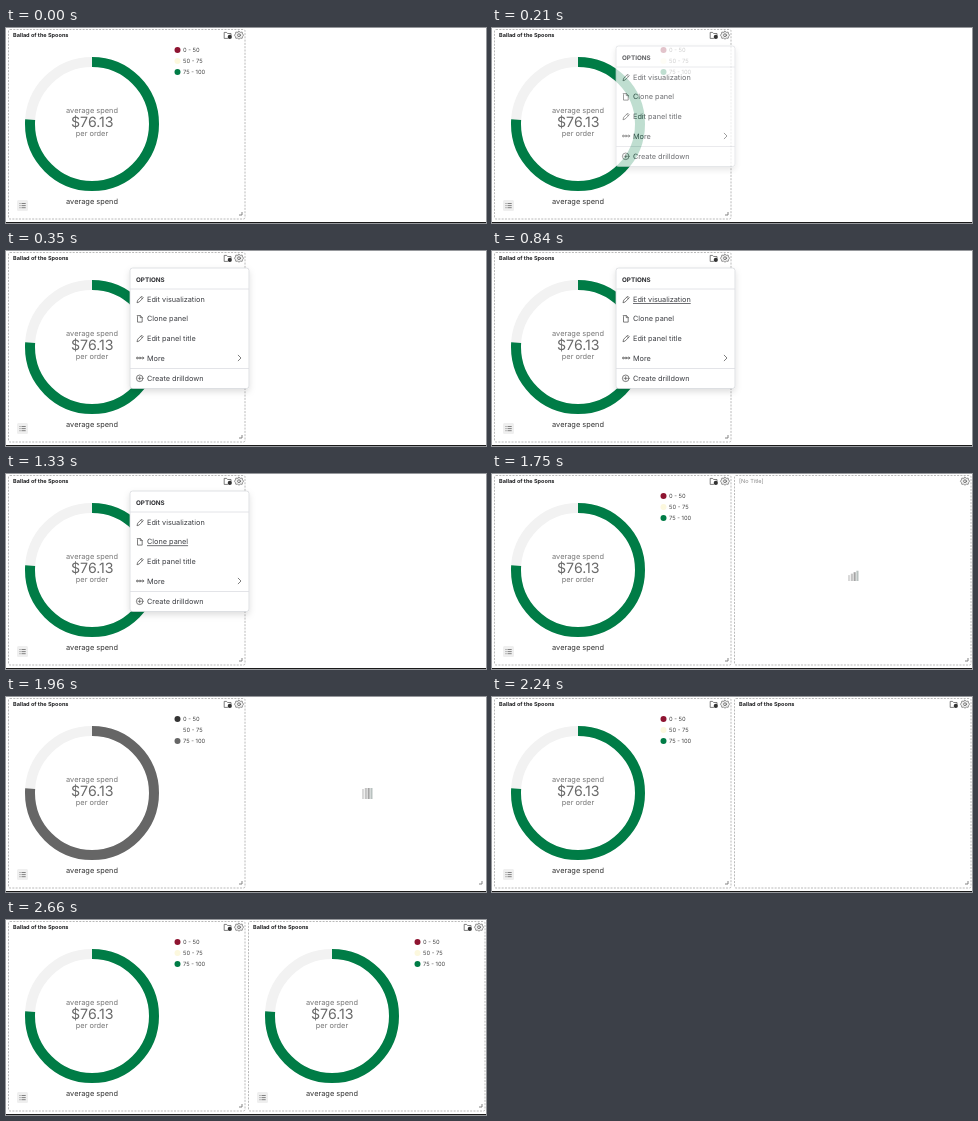
These frames come from a looping animation (480 px wide and 195 px high, 3010 ms). An HTML page:

```html
<!DOCTYPE html>
<html lang="en">
<head>
<meta charset="utf-8">
<title>Cloning a dashboard panel</title>
<style>
  html, body { margin: 0; width: 100%; height: 100%; overflow: hidden; background: #fff; }
  svg {
    display: block; width: 100%; height: 100%;
    font-family: Inter, "Liberation Sans", sans-serif;
    text-rendering: geometricPrecision;
    --good: #007c46; --mid: #fcf8de; --bad: #8e1431;
  }
  svg.mono { --good: #666; --mid: #fdfdfd; --bad: #343434; }
  .title { font-size: 5.55px; font-weight: 700; fill: #1d1e20; }
  .untitled { font-size: 5.6px; fill: #8a8a8a; }
  .legend { font-size: 5.8px; fill: #444; }
  .label { font-size: 7.4px; text-anchor: middle; fill: #777; }
  .value { font-size: 14.2px; text-anchor: middle; fill: #6a6a6a; }
  .caption { font-size: 7.4px; text-anchor: middle; fill: #333; }
  .item { font-size: 7.3px; fill: #3b3d42; }
  .head { font-size: 6.3px; font-weight: 700; fill: #2a2b2f; }
  .line { fill: none; stroke: #555; stroke-width: .75; stroke-linejoin: round; stroke-linecap: round; }
</style>
</head>
<body>
<svg id="stage" viewBox="0 0 480 195">
  <defs>
    <filter id="shadow" x="-15%" y="-15%" width="130%" height="135%">
      <feDropShadow dx="0" dy="3" stdDeviation="3" flood-color="#000" flood-opacity=".13"/>
    </filter>
    <clipPath id="loaderBox"><rect width="12" height="11"/></clipPath>

    <rect id="border" x="2.5" y="1.5" width="236.5" height="189.5" rx="1.5"
      fill="none" stroke="#a9a9a9" stroke-width=".8" stroke-dasharray="2 1.3"/>
    <path id="handle" d="M236 184v3h-3" fill="none" stroke="#777" stroke-width=".9"/>
    <g id="gear" class="line">
      <path d="M233 3.2l1.3 1.1 1.9-.2.4 1.8 1 1.3-1 1.4-.4 1.7-1.9-.1-1.3 1-1.3-1-1.9.1-.4-1.7-1-1.4 1-1.3.4-1.8 1.9.2z" fill="#f0f0f0" stroke="#737373"/>
      <circle cx="233" cy="7.2" r="1.4" fill="#fff"/>
    </g>
    <g id="folder">
      <path class="line" d="M221.5 10.4h-3.3v-6h2.4l1 1.1h3.4v1.6"/>
      <circle cx="223.8" cy="8.9" r="2.1" fill="#333"/>
    </g>
    <text id="name" class="title" x="7" y="9">Ballad of the Spoons</text>

    <g id="gauge">
      <circle cx="86" cy="96" r="62" fill="none" stroke="#f2f2f2" stroke-width="10"/>
      <circle cx="86" cy="96" r="62" fill="none" stroke="var(--good)" stroke-width="10"
        pathLength="100" stroke-dasharray="76.13 100" transform="rotate(-90 86 96)"/>
      <text class="label" x="86" y="85">average spend</text>
      <text class="value" x="86.3" y="99">$76.13</text>
      <text class="label" x="86" y="107.5">per order</text>
      <text class="caption" x="86" y="176">average spend</text>
      <g class="legend">
        <circle cx="171.5" cy="22" r="3" fill="var(--bad)"/><text x="177" y="24.1">0 - 50</text>
        <circle cx="171.5" cy="33" r="3" fill="var(--mid)"/><text x="177" y="35.1">50 - 75</text>
        <circle cx="171.5" cy="44" r="3" fill="var(--good)"/><text x="177" y="46.1">75 - 100</text>
      </g>
      <rect x="11" y="172" width="11" height="11" rx="1.5" fill="#efefef"/>
      <path d="M13.5 175.5h1m1 0h4.2M13.5 177.6h1m1 0h4.2M13.5 179.7h1m1 0h4.2" stroke="#777" stroke-width=".9"/>
    </g>
    <path id="pencil" class="line" d="M-2.9 2.9l.6-2.2 4-4 1.6 1.6-4 4zM.7-2.3l1.6 1.6"/>
  </defs>

  <use href="#border"/><use href="#handle"/><use href="#gear"/>
  <use href="#folder"/><use href="#name"/><use href="#gauge"/>

  <g transform="translate(240 0)">
    <use id="frame" href="#border"/>
    <use id="corner" href="#handle"/>
    <use id="cog" href="#gear"/>
    <text id="blank" class="untitled" x="7" y="9">[No Title]</text>
    <g id="named"><use href="#folder"/><use href="#name"/></g>
    <use id="copy" href="#gauge"/>
  </g>
  <g id="loader" clip-path="url(#loaderBox)"></g>

  <g id="menu">
    <rect x="124" y="17" width="119" height="120.5" rx="2.5" fill="#fff" stroke="#d2d4d8" stroke-width=".7" filter="url(#shadow)"/>
    <path d="M124 38h119M124 117.5h119" stroke="#dcdee2" stroke-width=".8"/>
    <text class="head" x="130" y="30.5">OPTIONS</text>
    <use href="#pencil" x="134" y="48.5"/>
    <path class="line" d="M131.5 65.8v5.3h4.7v-4.7l-1.8-1.8h-2.9zM134.3 64.7v1.9h1.9"/>
    <use href="#pencil" x="134" y="87.5"/>
    <g class="line">
      <circle cx="131.3" cy="107" r=".9"/><circle cx="134" cy="107" r=".9"/><circle cx="136.7" cy="107" r=".9"/>
      <path d="M232.2 104.2l2.8 2.8-2.8 2.8"/>
      <circle cx="133.7" cy="127.3" r="3.3"/><path d="M133.7 125.7v3.2M132.1 127.3h3.2"/>
    </g>
    <g class="item">
      <text id="edit" x="141" y="51">Edit visualization</text>
      <text id="clone" x="141" y="70.4">Clone panel</text>
      <text x="141" y="90">Edit panel title</text>
      <text x="141" y="109.8">More</text>
      <text x="141" y="129.9">Create drilldown</text>
    </g>
  </g>
  <rect y="194" width="480" height="1" fill="#1a1a1a"/>
</svg>

<script>
  const LOOP = 3010, STEP = 70;
  const $ = id => document.getElementById(id);
  const clamp = v => Math.max(0, Math.min(1, v));
  const show = (id, on) => $(id).style.display = on ? "" : "none";
  const underline = (id, on) => $(id).setAttribute("text-decoration", on ? "underline" : "none");

  const bars = ["#d9d9d9", "#c4c4c4", "#a4a4a4", "#b9c2c0"].map((color, i) => {
    const bar = document.createElementNS("http://www.w3.org/2000/svg", "rect");
    const attrs = { x: i * 2.8, width: 2.1, height: 11, fill: color };
    for (const key in attrs) bar.setAttribute(key, attrs[key]);
    return $("loader").appendChild(bar);
  });

  // Each bar dips by two thirds of its height, 100 ms after its neighbour.
  function drawLoader(age, y) {
    $("loader").setAttribute("transform", `translate(356 ${y})`);
    bars.forEach((bar, i) => {
      const phase = Math.max(0, age - i * 100) / 1000 % 1;
      bar.setAttribute("y", 7.3 * (1 - Math.abs(1 - 2 * phase)));
    });
  }

  function draw(t) {
    const between = (from, to) => t >= from && t < to;

    const alpha = t < 1330 ? clamp(t / 280) : clamp(1 - (t - 1330) / 220);
    $("menu").setAttribute("opacity", alpha);
    $("menu").setAttribute("transform", `translate(0 ${4 * (1 - alpha)})`);
    underline("edit", between(700, 1050));
    underline("clone", t >= 1050);

    const reloading = between(1890, 2030);
    show("frame", t >= 1400 && !reloading);
    show("cog", t >= 1400 && !reloading);
    show("corner", t >= 1400);
    show("blank", between(1400, 1890));
    show("named", t >= 2030);
    show("copy", t >= 2310);
    show("loader", between(1400, 2100));
    if (t < 1890) drawLoader(t - 1400, 96);
    else drawLoader(t - 1890, 91);
    $("stage").classList.toggle("mono", between(1960, 2240));
  }

  const start = performance.now();
  function tick() {
    const t = (performance.now() - start) % LOOP;
    draw(Math.floor(t / STEP) * STEP);
    requestAnimationFrame(tick);
  }
  tick();
</script>
</body>
</html>
```
